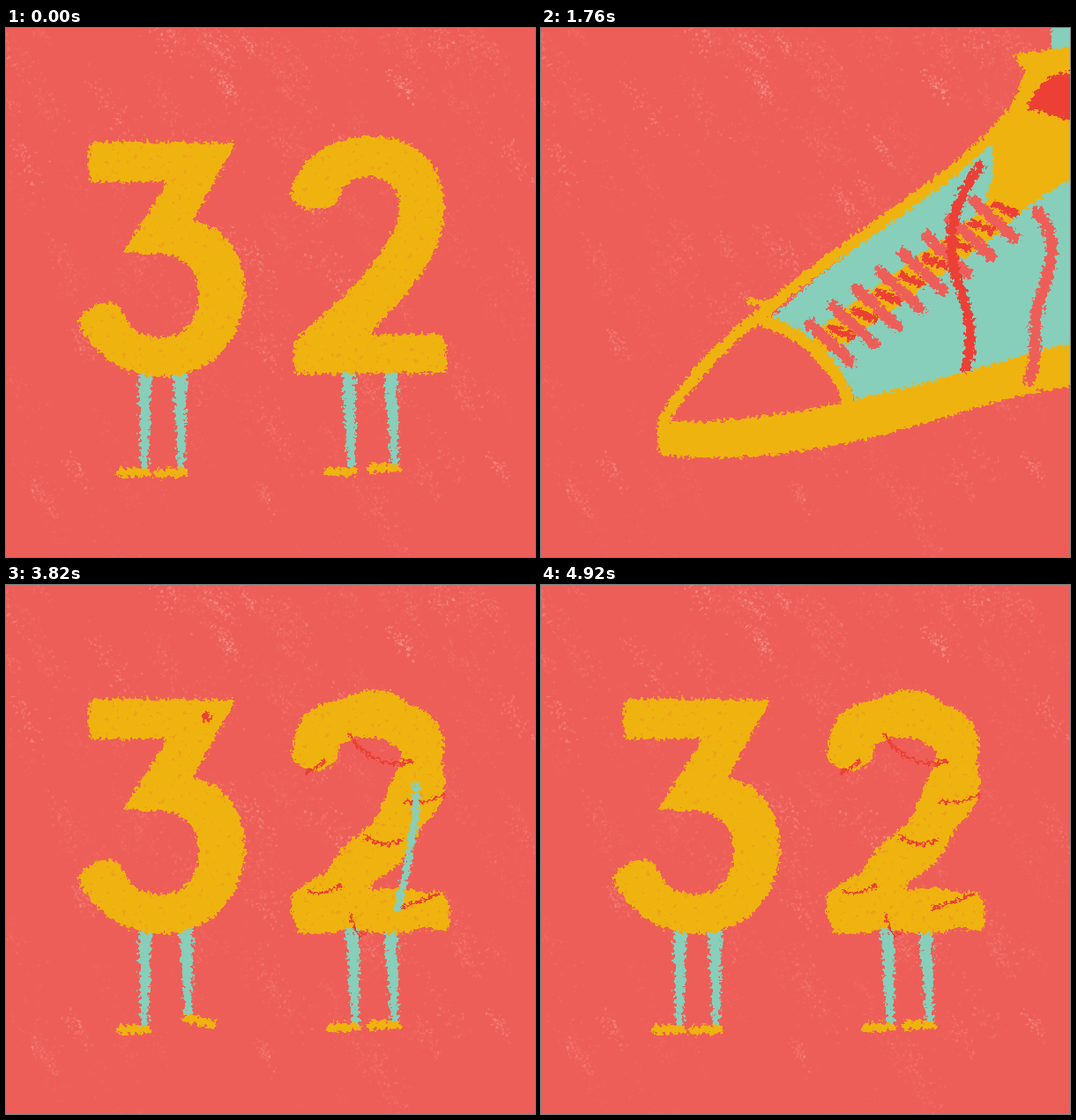
Animation, 600 px wide and 600 px high, one loop 4.96 s. Source, as an HTML page with a canvas:

```html
<!DOCTYPE html>
<html lang="en">
<head>
<meta charset="utf-8">
<title>32</title>
<style>
  html, body { margin: 0; width: 100%; height: 100%; overflow: hidden; background: #ee5e58; }
  canvas, svg { position: absolute; left: 0; top: 0; width: 600px; height: 600px; }
  .y { fill: #efb30f; }
  .t { fill: #87cfba; }
  .r { fill: #ec4036; }
  .p { fill: #ee5e58; }
  .ly, .lt, .lr, .lp { fill: none; stroke-linecap: round; stroke-linejoin: round; }
  .ly { stroke: #efb30f; }
  .lt { stroke: #87cfba; }
  .lr { stroke: #ec4036; }
  .lp { stroke: #ee5e58; }
</style>
</head>
<body>
<canvas id="paper" width="600" height="600"></canvas>
<svg viewBox="0 0 600 600">
  <defs>
    <filter id="rough" filterUnits="userSpaceOnUse" x="0" y="0" width="600" height="600" color-interpolation-filters="sRGB">
      <feTurbulence type="fractalNoise" baseFrequency=".24" numOctaves="2" seed="4"/>
      <feDisplacementMap in="SourceGraphic" scale="12" xChannelSelector="R" yChannelSelector="G"/>
    </filter>
    <filter id="grain" filterUnits="userSpaceOnUse" x="0" y="0" width="600" height="600" color-interpolation-filters="sRGB">
      <feTurbulence type="fractalNoise" baseFrequency=".24" numOctaves="2" seed="9" result="n"/>
      <feDisplacementMap in="SourceGraphic" in2="n" scale="12" xChannelSelector="R" yChannelSelector="G" result="s"/>
      <feTurbulence type="fractalNoise" baseFrequency=".16" numOctaves="2" seed="21"/>
      <feColorMatrix values="0 0 0 0 .93  0 0 0 0 .54  0 0 0 0 .18  9 0 0 0 -5.9"/>
      <feComponentTransfer><feFuncA type="linear" slope=".45"/></feComponentTransfer>
      <feComposite in2="s" operator="in"/>
      <feMerge><feMergeNode in="s"/><feMergeNode/></feMerge>
    </filter>
  </defs>

  <g id="pair">
    <g id="legs" filter="url(#rough)"></g>
    <path class="y" filter="url(#grain)" d="M99 129L261 130 211 219C246 224 271 255 271 297C271 352 232 396 177 396C138 396 100 372 83 337C80 322 105 310 121 312C130 314 134 322 133 326C142 342 158 351 176 351C203 351 219 328 219 303C219 272 200 256 170 256L133 254 184 174 98 175C92 172 91 134 99 129Z"/>
    <g filter="url(#grain)"><path id="two" class="y"/></g>
    <g id="marks" filter="url(#rough)"></g>
    <g filter="url(#rough)">
      <g id="eye"><ellipse class="r" rx="6" ry="5.5"/><circle id="pupil" class="y" r="1.8"/></g>
      <path id="arm" class="lt" stroke-width="8"/>
      <path id="swish" class="lt" stroke-width="2.5" stroke-dasharray="9 4" d="M318 292L345 287"/>
    </g>
  </g>

  <g id="shoe" filter="url(#rough)">
    <path class="t" d="M578 -9H610V40H580Z"/>
    <path class="t" d="M262 328C340 255 440 190 512 130L525 220 610 160V362C520 380 430 405 358 425C345 385 310 345 262 328Z"/>
    <path class="y" d="M535 30L610 20V170C572 183 550 205 527 222L503 198 513 165 512 135 498 126C522 104 542 80 548 48Z"/>
    <path class="r" d="M552 92C560 66 575 48 610 50V108C590 106 575 94 552 92Z"/>
    <path class="p" d="M150 442C180 395 215 355 255 340C300 352 330 390 342 426Z"/>
    <path class="ly" stroke-width="13" d="M140 443C165 402 210 352 250 325C330 252 440 192 510 124"/>
    <path class="ly" stroke-width="14" d="M254 333C298 345 338 385 349 424"/>
    <path class="ly" stroke-width="7" d="M237 310L262 313"/>
    <path class="y" d="M133 446C131 460 132 475 135 484C230 496 340 476 430 450C500 430 550 410 610 406V356C540 370 460 400 355 421C290 438 200 449 150 446Z"/>
    <path class="ly" stroke-width="32" d="M326 352L518 214"/>
    <g id="laces"></g>
    <path class="lr" stroke-width="11" d="M498 157C465 200 460 240 470 280C480 310 494 340 482 385"/>
    <path class="lp" stroke-width="13" d="M562 208C592 240 575 280 565 310C555 350 566 370 554 399"/>
  </g>
</svg>
<script>
const LOOP = 4960;
const $ = id => document.getElementById(id);
const lerp = (a, b, k) => a + (b - a) * k;

let seed = 32;
const rnd = () => (seed = (seed * 16807) % 2147483647) / 2147483647;
const bell = () => rnd() + rnd() + rnd() - 1.5;
const jit = r => (rnd() - .5) * 2 * r;

function add(parent, attrs) {
  const el = document.createElementNS('http://www.w3.org/2000/svg', 'path');
  for (const k in attrs) el.setAttribute(k, attrs[k]);
  return parent.appendChild(el);
}
// Touch the page only when a value changes, so the filters stay cached
function put(el, name, value) {
  if (el.getAttribute(name) !== String(value)) el.setAttribute(name, value);
}
const show = (el, on) => put(el, 'display', on ? 'inline' : 'none');

// Chalky paper: specks gathered along slanting streaks, denser towards the top
function drawPaper() {
  const c = $('paper').getContext('2d');
  c.fillStyle = '#ee5e58';
  c.fillRect(0, 0, 600, 600);
  c.fillStyle = '#f9aaa0';
  for (let i = 0; i < 150; i++) {
    const x = rnd() * 600, y = rnd() ** 1.3 * 600, len = 20 + rnd() * 35;
    const alpha = (.08 + .3 * rnd() ** 3) * (1.1 - y / 1200);
    for (let j = 0; j < 60; j++) {
      const u = bell() * len, v = bell() * len * .35;
      c.globalAlpha = alpha * (.3 + rnd());
      c.beginPath();
      c.ellipse(x + u * .55 - v * .8, y + u * .83 + v * .55, .6 + rnd() * 1.8, .5 + rnd(), rnd() * 3, 0, 7);
      c.fill();
    }
  }
}
drawPaper();

// Laces, each a step up the shoe
for (let i = 0; i < 8; i++) {
  const x = 305 + i * 26.5, y = 336 - i * 20;
  add($('laces'), { class: 'lp', 'stroke-width': 13, d: `M${x} ${y}l46 42` });
  add($('laces'), { class: 'lr', 'stroke-width': 9, d: `M${x + 25} ${y + 5}l22 9` });
}

// The 2 as a polygon: whole, lumpy with cracks, and fallen into a heap
const probe = add($('pair'), { fill: 'none' });
function sample(d, n = 260) {
  probe.setAttribute('d', d);
  const len = probe.getTotalLength();
  return Array.from({ length: n }, (_, i) => {
    const p = probe.getPointAtLength(len * i / n);
    return [p.x, p.y];
  });
}
const whole = sample('M328 392C326 378 325 360 330 352C352 330 392 300 420 262C438 237 446 217 446 200C446 180 430 169 412 169C392 169 380 180 376 197C366 206 350 208 341 204C330 201 322 196 323 187C330 150 365 123 415 123C465 123 497 155 497 205C497 262 455 300 411 348L492 347C500 349 503 385 497 391Z');
const cracked = whole.map(([x, y], i) => {
  const a = whole.at(i - 1), b = whole[(i + 1) % whole.length];
  const dx = b[0] - a[0], dy = b[1] - a[1], lump = 7 * Math.abs(Math.sin(i / 6)) - 3;
  const k = lump / Math.hypot(dx, dy);
  return [x + dy * k, y - dx * k];
});
const heap = sample('M290 513L318 486 318 440 306 390 340 335 340 240 370 220 440 208 486 194 515 228 515 345 545 410 553 482 598 494 598 508Z')
  .map(([x, y]) => [x + jit(3), y + jit(y < 300 ? 9 : 2)]);
probe.remove();
const morph = (a, b, k) => a.map((p, i) => [lerp(p[0], b[i][0], k), lerp(p[1], b[i][1], k)]);

const stroke = (cls, w, d) => add($('marks'), {
  class: cls, 'stroke-width': w, d, pathLength: 1, 'stroke-dasharray': '1 2'
});
const cracks = [[390, 169, 70, 31], [454, 245, 41, -7], [408, 284, 42, 5], [342, 347, 38, -6],
  [446, 366, 44, -16], [392, 375, 15, 19], [340, 212, 21, -13]]
  .map(([x, y, dx, dy]) => stroke('lr', 3.5, `M${x} ${y}q${dx * .4} ${dy + 12} ${dx} ${dy}`));

// Drips run down the heap: thin gaps of paper and red hooks
const drips = [];
for (let i = 0; i < 30; i++) {
  const y = 225 + rnd() * 240, spread = 85 + (y - 225) * .15;
  drips.push(stroke('lp', 2.5, `M${430 + jit(spread)} ${y}l${jit(3)} ${15 + rnd() * 25}`));
}
for (let row = 0; row < 4; row++) {
  for (let col = 0; col < 6; col++) {
    const x = 425 + (col - 2.5) * (33 + row * 3) + jit(10), y = 238 + row * 68 + jit(14);
    const drop = 28 + rnd() * 26, side = rnd() < .4 ? -1 : 1;
    drips.push(stroke('lr', 6.5, `M${x} ${y}l${side * 4} ${drop}q${side * 9} 6 ${side * 17} ${-rnd() * 24}`));
  }
}
drips.push(stroke('lr', 7, 'M304 370L294 440'), stroke('lr', 7, 'M527 300L545 380'),
  stroke('lr', 7, 'M290 513H336M388 511H440M472 507H596'));

function grow(list, k) {
  for (const el of list) {
    show(el, k > .02);
    put(el, 'stroke-dashoffset', 1 - k);
  }
}

// Leg: hip x, ankle x, ankle y, toe drop, facing (1 is left)
const legs = Array.from({ length: 4 }, () => ({
  shin: add($('legs'), { class: 't' }),
  foot: add($('legs'), { class: 'ly', 'stroke-width': 9.5 })
}));
function setLeg({ shin, foot }, [hip, x, y, drop, face]) {
  put(shin, 'd', `M${hip - 8} 384H${hip + 8}L${x + 4} ${y}H${x - 4}Z`);
  put(foot, 'd', `M${x + face * 2} ${y + 4}l${-face * 29} ${drop}`);
}

// Tracks of [time, pose]; the arm is elbow, wrist and fingertip
const standB = [197, 199, 500, 1, 1], liftB = [202, 206, 490, 8, 1], turnB = [204, 207, 487, 7, -1];
const stepC = [397, 353, 477, 10, 1];
const tucked = [466, 227, 466, 227, 466, 227], pointing = [372, 290, 272, 215, 256, 224];
const bent = [435, 282, 307, 277, 304, 298], hanging = [464, 290, 448, 350, 444, 367];
const tracks = {
  legA: [[0, [158, 157, 500, 0, 1]]],
  legB: [[380, standB], [780, liftB], [860, liftB], [1220, turnB], [3990, turnB], [4470, standB]],
  legC: [[380, [388, 392, 499, 0, 1]], [780, stepC], [860, stepC], [1220, [393, 396, 497, 1, 1]]],
  legD: [[0, [436, 441, 495, 0, 1]]],
  arm: [[380, tucked], [780, pointing], [940, pointing], [1220, bent], [3010, bent], [3480, hanging]],
  eye: [[380, [112, 155]], [780, [137, 152]], [940, [137, 152]], [1220, [227, 150]], [3990, [227, 150]], [4470, [112, 156]]],
  tall: [[380, [1]], [780, [1.016]], [3480, [1.016]], [3820, [1]]],
  crack: [[3480, [0]], [3820, [1]]],
  fall: [[3950, [0]], [4470, [1]], [4600, [1]], [4920, [0]]]
};
// Moves are drawn on held poses, about one each 50 ms
function at(name, t) {
  const track = tracks[name], i = track.findIndex(key => key[0] > t);
  if (i < 1) return track.at(i)[1];
  const [t0, a] = track[i - 1], [t1, b] = track[i];
  const steps = Math.round((t1 - t0) / 50), k = Math.floor((t - t0) / (t1 - t0) * steps) / steps;
  return a.map((v, j) => lerp(v, b[j], k));
}

function pose(t) {
  const closeUp = t >= 1760 && t < 2760, snap = t >= 2760 && t < 2800;
  const awake = t >= 380 && t < 4920;
  show($('shoe'), closeUp);
  show($('pair'), !closeUp);
  if (closeUp) return;

  show($('legs'), !snap);
  show($('swish'), snap);
  legs.forEach((leg, i) => setLeg(leg, at('leg' + 'ABCD'[i], t)));

  put($('eye'), 'transform', `translate(${at('eye', t)})`);
  show($('eye'), awake);
  show($('pupil'), t >= 4400);

  const [ex, ey, wx, wy, fx, fy] = at('arm', t);
  put($('arm'), 'd', `M466 227Q${ex} ${ey} ${wx} ${wy}L${fx} ${fy}`);
  show($('arm'), awake && ex < 466);

  const crack = at('crack', t)[0], fall = at('fall', t)[0], drop = fall * fall, tall = at('tall', t)[0];
  const body = fall ? morph(cracked, heap, drop) : morph(whole, cracked, crack);
  put($('two'), 'd', 'M' + body.map(([x, y]) =>
    `${x.toFixed(1)} ${(392 + (y - 392) * tall).toFixed(1)}`).join('L') + 'Z');
  grow(cracks, fall > .4 ? 0 : crack);
  grow(drips, drop);
}

let start = null;
function frame(now) {
  start ??= now;
  pose((now - start) % LOOP);
  requestAnimationFrame(frame);
}
pose(0);
requestAnimationFrame(frame);
</script>
</body>
</html>
```
